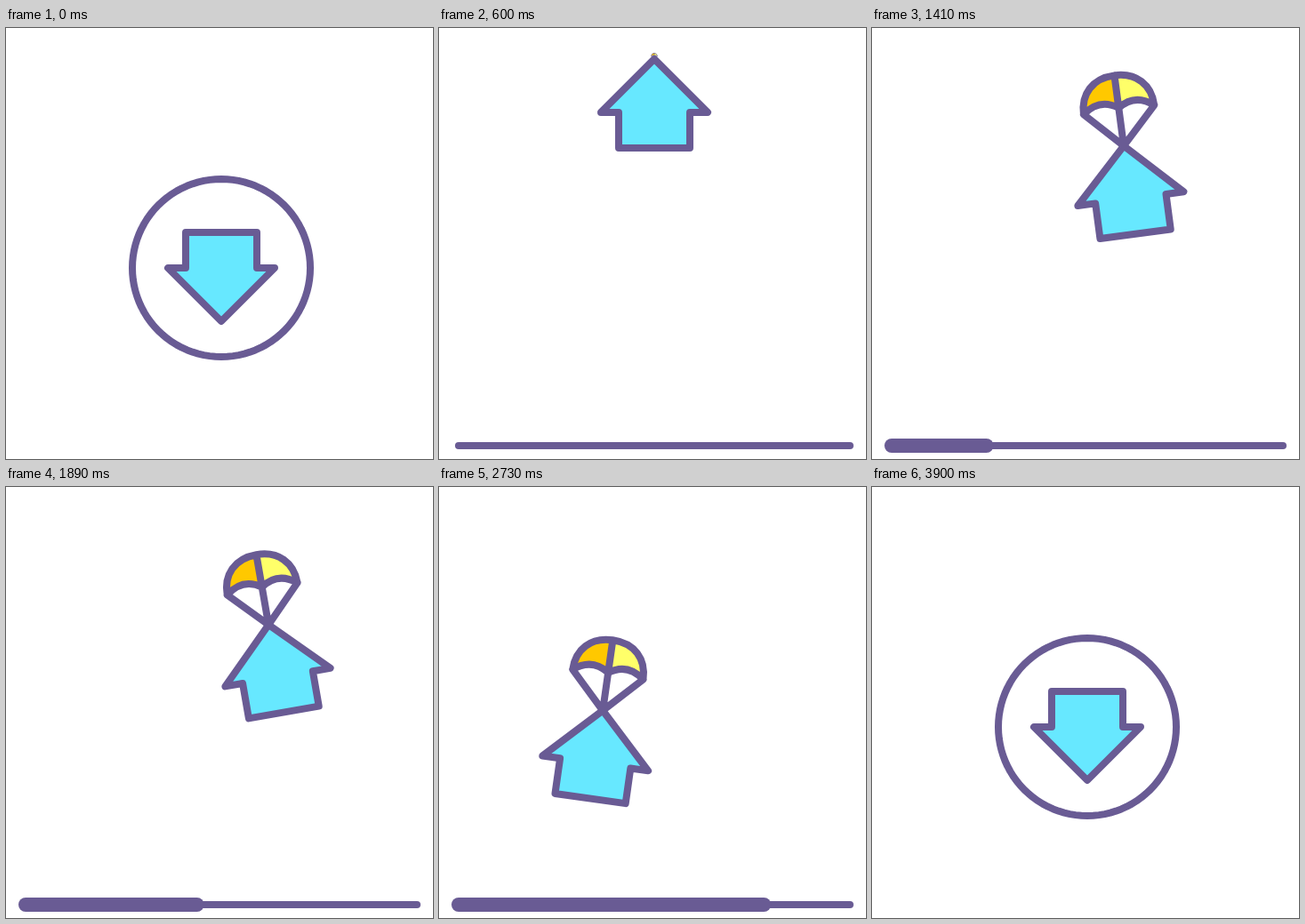
Recreate the animation shown at these times as an HTML page. Size 480x485 px, loop 3930 ms.

```html
<!DOCTYPE html>
<html lang="en">
<head>
<meta charset="utf-8">
<title>Download</title>
<style>
  html, body { margin: 0; width: 100%; height: 100%; overflow: hidden; background: #fff; }
  svg { display: block; width: 480px; height: 485px; }
  .ink { stroke: #695b94; stroke-width: 8; stroke-linecap: round; stroke-linejoin: round; fill: none; }
</style>
</head>
<body>
<svg viewBox="0 0 480 485">
  <path id="line" class="ink"/>
  <path id="bar" class="ink" style="stroke-width:16"/>
  <g id="body">
    <g id="chute">
      <path fill="#ffc800" d="M-40-41C-40-64-25-80 0-80V-43Q-20-57-40-41Z"/>
      <path fill="#ffff69" d="M40-41C40-64 25-80 0-80V-43Q20-57 40-41Z"/>
      <path class="ink" d="M0 0L-40-41C-40-64-25-80 0-80S40-64 40-41L0 0V-80M-40-41Q-20-57 0-43Q20-57 40-41"/>
    </g>
    <path id="arrow" class="ink" d="M-40-50H40V-10H60L0 50L-60-10H-40Z"/>
  </g>
</svg>
<script>
const LOOP = 3930, STEP = 30;
const JUMP = 30, PEAK = 540, OPEN = 840, RIGHT = 1755, LEFT = 2675, LAND = 3270, RISE = 3480, REST = 3780;
const BAR_START = 815, SEGMENTS = 96;

const [line, bar, body, chute, arrow] =
  ['line', 'bar', 'body', 'chute', 'arrow'].map(id => document.getElementById(id));

const mix = (a, b, k) => a + (b - a) * k;
const linear = (t, from, to) => Math.min(1, Math.max(0, (t - from) / (to - from)));
const phase = (t, from, to) => ease(linear(t, from, to));
const show = (el, on) => { el.style.display = on ? '' : 'none'; };

// cubic-bezier(.42, 0, .58, 1)
function ease(x) {
  if (x <= 0 || x >= 1) return x;
  let lo = 0, hi = 1;
  for (let i = 0; i < 20; i++) {
    const p = (lo + hi) / 2, q = 1 - p;
    if (1.26 * p * q * q + 1.74 * p * p * q + p ** 3 < x) lo = p; else hi = p;
  }
  return lo * lo * (3 - 2 * lo);
}

// Ring cut open at the top and unrolled into a sagging line
function ringToLine(flat, y, sag) {
  const points = Array.from({ length: SEGMENTS + 1 }, (_, i) => {
    const u = 2 * i / SEGMENTS - 1, angle = Math.PI * u;
    const px = mix(242 + 100 * Math.sin(angle), 242 + 220 * u, flat);
    const py = mix(270 + 100 * Math.cos(angle), y - sag * u * u, flat);
    return px.toFixed(2) + ' ' + py.toFixed(2);
  });
  return 'M' + points.join('L');
}

function draw(t) {
  const jump = phase(t, JUMP, PEAK), open = phase(t, PEAK, OPEN);
  const right = phase(t, OPEN, RIGHT), left = phase(t, RIGHT, LEFT), land = phase(t, LEFT, LAND);
  const close = phase(t, LAND, LAND + 300), rise = phase(t, RISE, REST);

  const spread = phase(t, JUMP, 295);
  const lineY = 370 + 116 * phase(t, 215, 450) - 16 * phase(t, 450, PEAK) - 100 * rise;
  const sag = 4 * (spread - phase(t, 300, 400));
  line.setAttribute('d', ringToLine(spread - rise, lineY, sag));
  line.style.strokeWidth = t < LAND ? 8 : 16 - 8 * rise;

  show(bar, t >= BAR_START && t < LAND);
  bar.setAttribute('d', `M22 470H${22.01 + 440 * linear(t, BAR_START, LAND)}`);

  const x = 242 + 67.5 * right - 133.5 * left + 66 * land;
  const y = 280 - 200 * jump + 60 * open + 60 * right + 99 * left + 121 * land - 140 * rise;
  const tilt = -10.7 * right + 18.9 * left - 8.2 * land;
  body.setAttribute('transform', `translate(${x} ${y}) rotate(${tilt})`);
  arrow.setAttribute('transform', `rotate(${-180 * (jump + rise)})`);

  const size = open - close;
  show(chute, size > 0.001);
  chute.setAttribute('transform', `translate(0 ${90 * close - 50}) scale(${size})`);

  const green = linear(t, LAND, LAND + 250) * (1 - linear(t, 3600, 3900));
  arrow.style.fill = `rgb(${mix(103, 112, green)}, ${mix(232, 255, green)}, ${mix(255, 130, green)})`;
}

const start = performance.now();
function tick() {
  const t = (performance.now() - start) % LOOP;
  draw(Math.floor(t / STEP) * STEP);
  requestAnimationFrame(tick);
}
tick();
</script>
</body>
</html>
```
